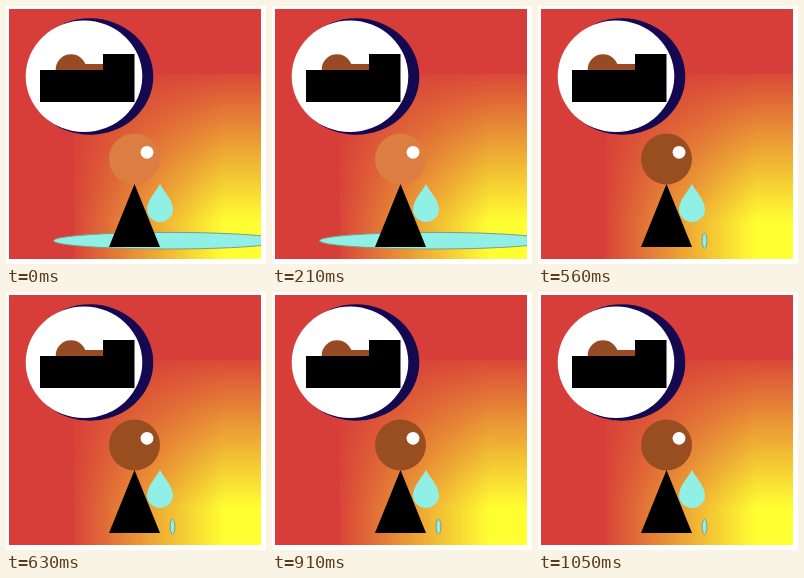
Write an HTML page that moves like this. It is 260 px wide and 258 px high and loops after 1120 ms.

```html
<!DOCTYPE html>
<html lang="en">
<head>
<meta charset="utf-8">
<title>Daydream</title>
<style>
  html, body { margin: 0; width: 100%; height: 100%; overflow: hidden; background: #fff; }
  svg { display: block; width: 100vw; height: 100vh; }
</style>
</head>
<body>
<svg viewBox="0 0 260 258" preserveAspectRatio="none">
  <defs>
    <linearGradient id="across" gradientUnits="userSpaceOnUse" x1="68" y1="0" x2="218" y2="0">
      <stop offset="0" stop-color="#ffff32" stop-opacity=".04"/>
      <stop offset="1" stop-color="#ffff32"/>
    </linearGradient>
    <linearGradient id="down" gradientUnits="userSpaceOnUse" x1="0" y1="68" x2="0" y2="216">
      <stop offset="0" stop-color="#fff" stop-opacity=".06"/>
      <stop offset="1" stop-color="#fff"/>
    </linearGradient>
    <mask id="fade" maskUnits="userSpaceOnUse" x="68" y="68" width="187" height="185">
      <rect x="68" y="68" width="187" height="185" fill="url(#down)"/>
    </mask>
    <clipPath id="sky"><rect x="3" y="3" width="252" height="250"/></clipPath>
  </defs>

  <g clip-path="url(#sky)">
    <rect x="3" y="3" width="252" height="250" fill="#d83e39"/>
    <rect x="68" y="68" width="187" height="185" fill="url(#across)" mask="url(#fade)"/>

    <!-- thought bubble -->
    <ellipse cx="84" cy="70.5" rx="63.3" ry="58.3" fill="#140850"/>
    <ellipse cx="78" cy="70.3" rx="58.3" ry="55.7" fill="#fff"/>
    <g fill="#964b25">
      <circle cx="65" cy="63.5" r="15.3"/>
      <rect x="77" y="58" width="21" height="7"/>
    </g>
    <path d="M34 64H97V48H128.500V96H34Z"/>

    <!-- figure -->
    <ellipse id="pool" fill="#91f0e6" stroke="#7c9c88" stroke-width="1"/>
    <circle id="head" cx="128.500" cy="153" r="25.500"/>
    <circle cx="141" cy="146.300" r="6.400" fill="#fff"/>
    <path d="M128.500 178L154 241H103Z"/>
    <path d="M154 178C158 186 167 194 167 203.500A13 12.500 0 0 1 141 203.500C141 194 150 186 154 178Z" fill="#91f0e6"/>
  </g>
</svg>
<script>
  const LOOP = 1120, DRY = 490;
  const pool = document.getElementById('pool');
  const head = document.getElementById('head');

  function setAttrs(el, attrs) {
    for (const key in attrs) el.setAttribute(key, attrs[key]);
  }

  function draw(t) {
    const full = t < DRY;
    setAttrs(pool, full
      ? { cx: 162, cy: 234.7, rx: 114.5, ry: 8.3 }
      : { cx: 166.5, cy: 234.7, rx: 2.4, ry: 7.6 });
    setAttrs(head, { fill: full ? '#dc7d41' : '#984e20' });
  }

  let start = null;
  function tick(now) {
    if (start === null) start = now;
    draw((now - start) % LOOP);
    requestAnimationFrame(tick);
  }
  draw(0);
  requestAnimationFrame(tick);
</script>
</body>
</html>
```
